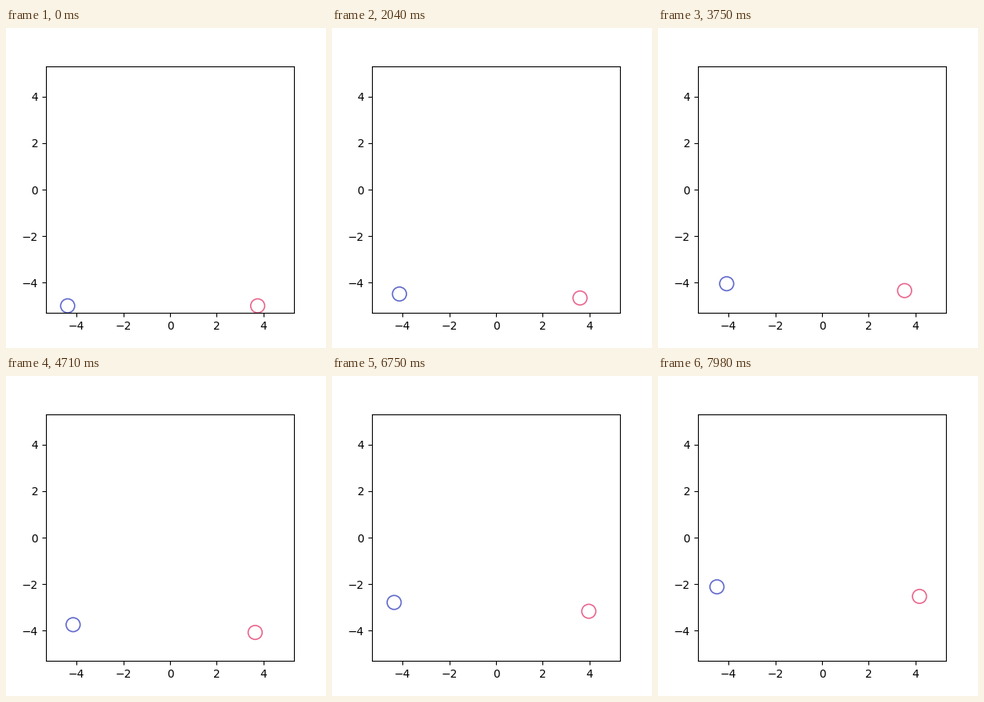
A matplotlib script for the animation above (8000 ms loop, 400 by 400 pixels).

```python
import numpy as np
import matplotlib.pyplot as plt
from matplotlib.animation import FuncAnimation
from matplotlib.patches import Circle

LOOP, INTERVAL = 8000, 20   # ms
LIMIT, RADIUS = 5.3, 0.3

fig, ax = plt.subplots(figsize=(4, 4), dpi=100)
ax.set_xlim(-LIMIT, LIMIT)
ax.set_ylim(-LIMIT, LIMIT)


def glide(t, start, before, after, turn, ease):
    """Position at t seconds; speed eases from `before` to `after` around `turn`."""
    return start + before * t + (after - before) * ease * np.logaddexp(0, (t - turn) / ease)


def blue_path(t):
    return (glide(t, start=-4.373, before=0.1345, after=-0.111, turn=3.13, ease=0.66),
            glide(t, start=-5, before=0.249, after=0.547, turn=4.98, ease=0.58))


def pink_path(t):
    return (glide(t, start=3.748, before=-0.0775, after=0.162, turn=3.65, ease=0.36),
            glide(t, start=-5, before=0.164, after=0.522, turn=4.74, ease=0.63))


def add_ring(path, color):
    ring = Circle(path(0), RADIUS, fill=False, ec=color, lw=1.2)
    return ax.add_patch(ring), path


rings = [add_ring(blue_path, "#626bcb"), add_ring(pink_path, "#e9688f")]


def update(i):
    for ring, path in rings:
        ring.center = path(i * INTERVAL / 1000)
    return [ring for ring, _ in rings]


anim = FuncAnimation(fig, update, frames=LOOP // INTERVAL, interval=INTERVAL,
                     repeat=True, repeat_delay=0)
plt.show()
```
